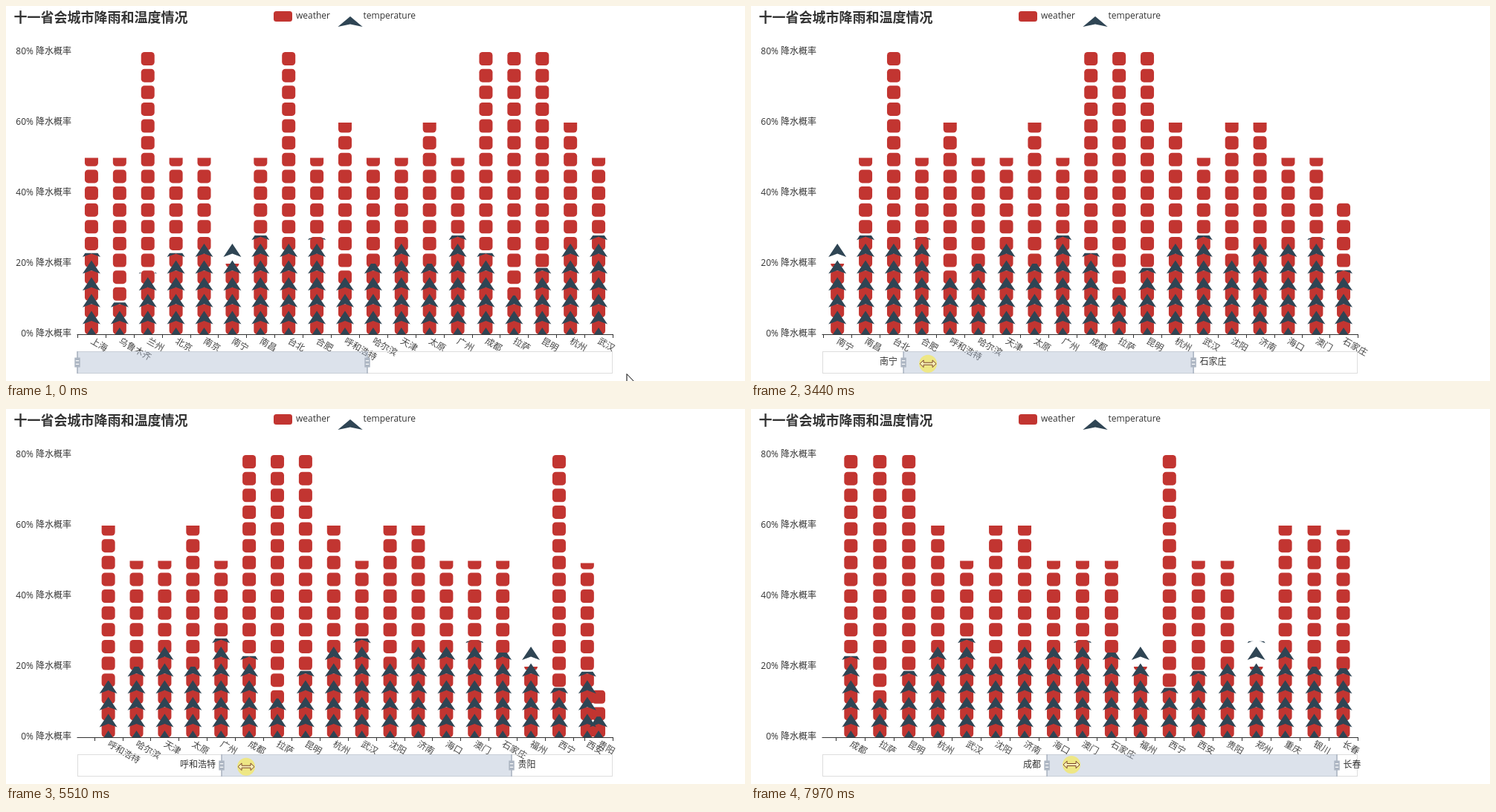
An HTML page with a canvas for the animation above (8 s loop, 994x505 px).

```html
<!DOCTYPE html>
<html lang="zh">
<head>
<meta charset="utf-8">
<title>Weather chart</title>
<style>
html, body { margin: 0; width: 100%; height: 100%; overflow: hidden; background: #fff; }
canvas { display: block; }
</style>
</head>
<body>
<canvas id="stage" width="994" height="505"></canvas>
<script>
const ctx = document.getElementById('stage').getContext('2d');
const LOOP = 8000, PRESS = 880;
const LEFT = 96, RIGHT = 816, BASE = 442, UNIT = 4.75;
const SIZE = 18, COUNT = 17, PITCH = (380 - SIZE) / (COUNT - 1);
const SPAN = 390, TOP = 465, DEPTH = 30;
const STEP = (RIGHT - LEFT) / 33, LAG = 5.6;
const RED = '#c23531', NAVY = '#2f4554', INK = '#333';
const FONT = '"Open Sans", "Noto Sans CJK SC", "Noto Sans CJK", sans-serif';

const names = `上海 乌鲁木齐 兰州 北京 南京 南宁 南昌 台北 合肥 呼和浩特 哈尔滨 天津 太原 广州 成都 拉萨
昆明 杭州 武汉 沈阳 济南 海口 澳门 石家庄 福州 西宁 西安 贵阳 郑州 重庆 银川 长春`.split(/\s+/);
const rainGroups = {
  20: '南宁 福州 郑州',
  60: '呼和浩特 太原 杭州 沈阳 济南 重庆 银川 长春',
  80: '兰州 台北 成都 拉萨 昆明 西宁'
};
const tempGroups = {
  9: '乌鲁木齐', 11: '拉萨', 14: '西宁', 16: '呼和浩特', 17.5: '兰州', 18.8: '昆明 西安',
  20: '哈尔滨 太原 银川 长春', 21: '沈阳 贵阳', 23: '上海 北京 成都', 24: '石家庄',
  27.2: '合肥 澳门 郑州', 28: '南昌 广州 武汉'
};

function lookup(groups, name, usual) {
  const hit = Object.keys(groups).find(key => groups[key].split(' ').includes(name));
  return hit ? +hit : usual;
}

const cities = names.map(name => ({
  name, rain: lookup(rainGroups, name, 50), temp: lookup(tempGroups, name, 26)
}));

// Drag of the slider: time, left edge
const drag = [
  [960, 96], [1435, 112.5], [1510, 124], [1824, 156], [2318, 178], [2440, 179], [4073, 221.6],
  [4280, 243], [5463, 287], [5510, 290], [6552, 330.7], [6844, 352.5], [6970, 355], [7904, 396], [8000, 399]
];
const pointerY = [[70, 495], [830, 484], [1510, 484], [2440, 479], [4280, 484], [6970, 479]];

function track(keys, t) {
  const i = keys.findIndex(key => key[0] > t);
  if (i === 0) return keys[0][1];
  if (i < 0) return keys[keys.length - 1][1];
  const [t0, v0] = keys[i - 1], [t1, v1] = keys[i];
  return v0 + (v1 - v0) * (t - t0) / (t1 - t0);
}

// The visible range moves on one city each time the slider has passed half a step
const timeOf = track.bind(null, drag.map(([t, x]) => [x, t]));
const windows = Array.from({ length: 15 }, (_, k) => ({
  at: k ? timeOf(LEFT + (k - 0.5) * STEP + LAG) : -LOOP,
  first: k,
  last: Math.min(k + 18, cities.length - 1)
}));

const clamp = v => Math.min(1, Math.max(0, v));
const slide = dt => 1 - (1 - clamp(dt / 300)) ** 3;
const grow = dt => dt >= 1000 ? 1 : 1 - 2 ** (-dt / 100);
const band = w => (RIGHT - LEFT) / (w.last - w.first + 1);
const slot = (w, i) => LEFT + band(w) * (i - w.first + 0.5);

function place(i, t) {
  const entry = windows.findIndex(w => i <= w.last);
  let x = slot(windows[entry], i);
  for (let k = entry + 1; k < windows.length; k++) {
    x += (slot(windows[k], i) - slot(windows[k - 1], i)) * slide(t - windows[k].at);
  }
  return { x, scale: grow(t - windows[entry].at) };
}

function text(str, x, y, align = 'left', size = 12, weight = 400) {
  ctx.font = `${weight} ${size}px ${FONT}`;
  ctx.textAlign = align;
  ctx.fillText(str, x, y);
}

function box(x, y, w, h) {
  ctx.fillStyle = RED;
  ctx.beginPath();
  ctx.roundRect(x, y, w, h, Math.min(w, h) / 4);
  ctx.fill();
}

function polygon(points) {
  ctx.beginPath();
  points.forEach(([x, y]) => ctx.lineTo(x, y));
  ctx.closePath();
}

function arrow(x, y, w, h) {
  const dx = w * 2 / 3;
  ctx.fillStyle = NAVY;
  polygon([[x, y], [x + dx, y + h], [x, y + h * 0.75], [x - dx, y + h]]);
  ctx.fill();
}

function column(x, value, draw) {
  const h = value * UNIT;
  ctx.save();
  ctx.beginPath();
  ctx.rect(x - 20, BASE - h, 40, h);
  ctx.clip();
  for (let k = 0; k < COUNT; k++) draw(x, BASE - SIZE / 2 - k * PITCH);
  ctx.restore();
}

function drawHeader() {
  box(360, 7, 25, 14);
  arrow(463, 14, 25, 14);
  ctx.fillStyle = INK;
  text('十一省会城市降雨和温度情况', 10.5, 21.5, 'left', 18, 700);
  text('weather', 390, 17);
  text('temperature', 480.5, 17);
  for (let p = 0; p <= 80; p += 20) text(`${p}% 降水概率`, 88, BASE - p * UNIT + 3, 'right');
}

function drawChart(view, t) {
  const items = cities.slice(view.first, view.last + 1)
    .map((city, k) => ({ ...city, ...place(view.first + k, t) }));
  ctx.fillStyle = INK;
  ctx.fillRect(LEFT - 0.5, BASE, RIGHT - LEFT + 1, 1);
  items.forEach(d => ctx.fillRect(Math.round(d.x - band(view) / 2), BASE, 1, 5));
  ctx.fillRect(RIGHT, BASE, 1, 5);
  ctx.fillStyle = '#444';
  for (const d of items) {
    ctx.save();
    ctx.translate(d.x, BASE + 8);
    ctx.rotate(Math.PI / 6);
    text(d.name, 0, 4);
    ctx.restore();
  }
  items.forEach(d => column(d.x, d.rain * d.scale, (x, y) => box(x - 9, y - 9, SIZE, SIZE)));
  items.forEach(d => column(d.x, d.temp * d.scale, (x, y) => arrow(x, y, SIZE, SIZE)));
}

function drawHandle(x) {
  const mid = TOP + DEPTH / 2;
  ctx.fillStyle = '#acb5c2';
  ctx.fillRect(x - 0.8, TOP, 1.6, DEPTH);
  ctx.fillRect(x - 3.7, mid - 6.5, 7.4, 13);
  ctx.fillStyle = '#fff';
  ctx.fillRect(x - 2.2, mid - 2.9, 4.4, 1.2);
  ctx.fillRect(x - 2.2, mid + 1.7, 4.4, 1.2);
}

function drawSlider(view, x, labelled) {
  ctx.strokeStyle = '#ddd';
  ctx.lineWidth = 1;
  ctx.strokeRect(LEFT + 0.5, TOP + 0.5, RIGHT - LEFT - 1, DEPTH - 1);
  ctx.fillStyle = 'rgba(167,183,204,0.4)';
  ctx.fillRect(x, TOP, SPAN, DEPTH);
  drawHandle(x);
  drawHandle(x + SPAN);
  if (!labelled) return;
  ctx.fillStyle = INK;
  text(cities[view.first].name, x - 8, 483, 'right');
  text(cities[view.last].name, x + SPAN + 8.5, 483);
}

function drawPointer(x, y, pressed, overBar) {
  ctx.save();
  ctx.translate(x, y);
  if (pressed) {
    ctx.fillStyle = 'rgba(248,234,80,0.66)';
    ctx.beginPath();
    ctx.arc(0, 0, 12, 0, 7);
    ctx.fill();
  }
  ctx.lineWidth = 1;
  if (overBar) {
    const half = [[-11, 0], [-6, -4.8], [-6, -1.5], [6, -1.5], [6, -4.8]];
    polygon([...half, ...half.map(([px, py]) => [-px, -py])]);
    ctx.fillStyle = '#f8f0b8';
    ctx.strokeStyle = '#7a442c';
  } else {
    polygon([[0.5, 0.5], [0.5, 16], [4, 12.5], [7, 19], [9, 18], [6.5, 11.5], [11, 11.5]]);
    ctx.fillStyle = '#fff';
    ctx.strokeStyle = '#000';
  }
  ctx.fill();
  ctx.stroke();
  ctx.restore();
}

function render(t) {
  const view = windows.filter(w => w.at <= t).pop();
  const bar = track(drag, t);
  const u = clamp((t - 70) / 760);
  const x = 834.5 + (bar + 33 - 834.5) * u * u * (3 - 2 * u);
  ctx.fillStyle = '#fff';
  ctx.fillRect(0, 0, 994, 505);
  drawHeader();
  drawChart(view, t);
  drawSlider(view, bar, x < RIGHT);
  drawPointer(x, track(pointerY, t), t > PRESS, x < bar + SPAN);
}

const start = performance.now();
function tick() {
  render((performance.now() - start) % LOOP);
  requestAnimationFrame(tick);
}
tick();
</script>
</body>
</html>
```
